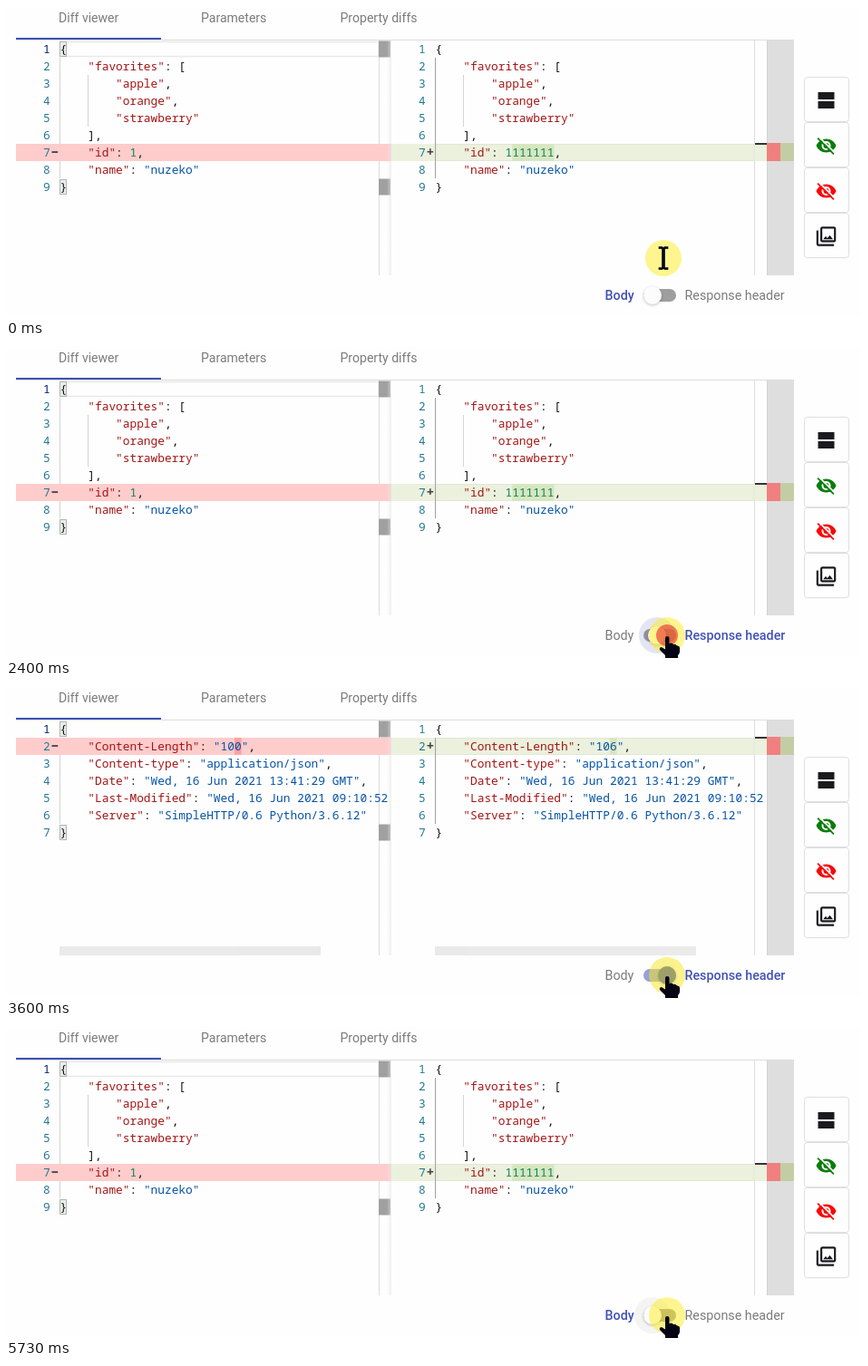
Animation, 944 px wide and 344 px high, one loop 6010 ms. Source, as an HTML page:

```html
<!DOCTYPE html>
<html lang="en">
<head>
<meta charset="utf-8">
<title>Diff viewer</title>
<style>
html, body { margin: 0; width: 100%; height: 100%; overflow: hidden; background: #fefefe; }
svg { display: block; width: 944px; height: 344px; }
text { white-space: pre; }
.ui { font: 400 14.3px Roboto, sans-serif; fill: #7b7b7b; }
.ui.tab { font-size: 14.05px; }
.ui.active { font-weight: 500; fill: #3f51b5; }
.code { font: 12.83px "Noto Sans Mono", monospace; fill: #111; }
.code.sign { font-size: 14.5px; font-weight: 700; fill: #444; }
.key { fill: #a31515; }
.str { fill: #0451a5; }
.num { fill: #098658; }
.line-no { fill: #237893; }
.line-no.current { fill: #0b216f; }
#thumb { filter: drop-shadow(0 1px 1.5px rgba(0, 0, 0, .25)); }
</style>
</head>
<body>
<svg id="stage" viewBox="0 0 944 344"></svg>
<script>
const LOOP = 6010, STEP = 1000 / 15;
const TOP = 38, ROW = 19, CHAR = 7.698;
const DIGITS_AT = { body: 11, header: 25 };

const rect = (x, y, w, h, fill, extra = '') =>
  `<rect x="${x}" y="${y}" width="${w}" height="${h}" fill="${fill}" ${extra}/>`;
const text = (x, y, cls, str, extra = '') =>
  `<text x="${x}" y="${y}" class="${cls}" ${extra}>${str}</text>`;
const rowY = n => TOP + ROW * (n - 1);

const bodyLines = id => [
  '{', '    "favorites": [', '        "apple",', '        "orange",', '        "strawberry"',
  '    ],', `    "id": ${id},`, '    "name": "nuzeko"', '}'];
const headerLines = length => [
  '{', `    "Content-Length": "${length}",`, '    "Content-type": "application/json",',
  '    "Date": "Wed, 16 Jun 2021 13:41:29 GMT",',
  '    "Last-Modified": "Wed, 16 Jun 2021 09:10:52',
  '    "Server": "SimpleHTTP/0.6 Python/3.6.12"', '}'];

function highlight(line) {
  const isArrayItem = line.startsWith('        ');
  return line.replace(/("[^"]*"?)(:?)|(\d+)/g, (_, str, colon, num) => {
    if (num) return `<tspan class="num">${num}</tspan>`;
    const cls = colon || isArrayItem ? 'key' : 'str';
    return `<tspan class="${cls}">${str}</tspan>${colon}`;
  });
}

function codeRows(x, lines, changed, sign, currentRow) {
  return lines.map((line, i) => {
    const n = i + 1, y = rowY(n) + 14;
    return text(x - 18.5, y, 'code line-no' + (n === currentRow ? ' current' : ''), n) +
      (n === changed ? text(x - 10, y, 'code sign', sign) : '') +
      text(x, y, 'code', highlight(line));
  }).join('');
}

function guides(x, last, nested, color) {
  return rect(x, rowY(2), 1, ROW * (last - 2), color) +
    (nested ? rect(x + 31, rowY(3), 1, ROW * 3, '#d3d3d3') : '');
}

function leftPane(lines, changed, mark, framed) {
  const x = 59.5, last = lines.length;
  const ends = [1, last].map(n =>
    rect(411, rowY(n) + .5, 13, 18, '#a0a0a0') +
    rect(59.5, rowY(n) + 1.5, 7, 16, '#e8efe8', 'stroke="#b4b4b4"')).join('');
  return (framed ? rect(60, 39.5, 351, 16, 'none', 'stroke="#e8e8e8" stroke-width="1.5"') : '') +
    guides(59, last, framed, '#d3d3d3') + ends +
    rect(11, rowY(changed), 414, ROW, '#ffcccc') +
    (mark ? rect(x + CHAR * mark, rowY(changed), CHAR, ROW, '#ffa3a3') : '') +
    codeRows(x, lines, changed, '−', 1);
}

function rightPane(lines, changed, mark, markLength) {
  const x = 473.5, y = rowY(changed);
  return rect(425, y, 414, ROW, '#ebf1dd') +
    rect(474, y + .5, 351, ROW - 1, 'none', 'stroke="#e2e6d6"') +
    rect(x + CHAR * mark, y, CHAR * markLength, ROW, '#d7e6c0') +
    guides(473, lines.length, lines.length > 8, '#a2a2a2') +
    codeRows(x, lines, changed, '+') +
    rect(826, y - 1, 13, 2, '#333') +
    rect(839, y - 1, 15, 20, '#f08080') + rect(854, y - 1, 15, 20, '#c3cda5');
}

const hiddenEye = color => `
  <path d="M1 12C2.7 7.6 7 4.5 12 4.5S21.3 7.6 23 12C21.3 16.4 17 19.5 12 19.5S2.7 16.4 1 12Z" fill="${color}"/>
  <circle cx="12" cy="12" r="5" fill="#fefefe"/><circle cx="12" cy="12" r="3" fill="${color}"/>
  <path d="M4 2.4L21.8 20.2" stroke="#fefefe" stroke-width="1.9"/>
  <path d="M2.6 3.6L20.4 21.4" stroke="${color}" stroke-width="1.8"/>`;

const icons = [
  rect(3, 3, 18, 8, '#1b1b1f') + rect(3, 13, 18, 8, '#1b1b1f'),
  hiddenEye('#0a7d0a'),
  hiddenEye('#f80808'),
  `<path fill="#1b1b1f" transform="translate(-.9 -.9) scale(1.075)" d="M20 4v12H8V4h12m0-2H8c-1.1 0-2 .9-2 2v12c0 1.1.9 2 2 2h12c1.1 0 2-.9 2-2V4c0-1.1-.9-2-2-2zm-8.5 9.67l1.69 2.26 2.48-3.1L19 15H9zM2 6v14c0 1.1.9 2 2 2h16v-2H4V6H2z"/>`];

const buttons = icons.map((icon, i) =>
  rect(880.5, 78.5 + 50 * i, 49, 49, '#fefefe', 'rx="3" stroke="#dedee2"') +
  `<g transform="translate(892.5 ${92 + 50 * i})">${icon}</g>`).join('');

document.getElementById('stage').innerHTML = `
  <defs><linearGradient id="edge">
    <stop offset="0" stop-color="#e6e6e6" stop-opacity="0"/><stop offset="1" stop-color="#e6e6e6" stop-opacity=".6"/>
  </linearGradient></defs>
  ${text(58, 18, 'ui tab', 'Diff viewer')}${text(215, 18, 'ui tab', 'Parameters')}${text(368.5, 18, 'ui tab', 'Property diffs')}
  ${rect(11, 37, 858, 1, '#dcdcdc')}${rect(11, 35, 160, 2, '#3f51b5')}
  ${rect(839, 38, 30, 259, '#dedede')}
  ${rect(411, 38, 1, 259, '#dcdce0')}${rect(825, 38, 1, 259, '#dcdce0')}${rect(839, 38, 1, 259, '#d2d2d6')}
  <g id="body">${leftPane(bodyLines(1), 7, 0, true)}${rightPane(bodyLines(1111111), 7, DIGITS_AT.body, 6)}</g>
  <g id="header">${leftPane(headerLines(100), 2, DIGITS_AT.header, false)}${rightPane(headerLines(106), 2, DIGITS_AT.header, 1)}</g>
  ${rect(420, 38, 5, 259, 'url(#edge)')}
  <g id="scrollbars">${rect(59, 287, 288, 10, '#c1c1c1')}${rect(473, 287, 288, 10, '#c1c1c1')}</g>
  ${buttons}
  ${text(660.5, 324, 'ui', 'Body', 'id="bodyLabel"')}
  ${text(748.5, 324, 'ui', 'Response header', 'id="headerLabel"')}
  ${rect(703, 312, 36, 14, '#9e9e9e', 'rx="7" id="track"')}
  <circle id="ripple" cy="319" r="20"/>
  <circle id="thumb" cy="319" r="10"/>
  <g id="pointer">
    <circle r="20" fill="#ffee20" fill-opacity=".5"/>
    <circle id="press" fill="#e62a2a"/>
    <path id="beam" d="M-5.5 -13H-1L0 -12L1 -13H5.5V-10H2V10H5.5V13H1L0 12L-1 13H-5.5V10H-2V-10H-5.5Z"
      fill="#080808" stroke="#fff" stroke-opacity=".5" stroke-width=".6"/>
    <path id="hand" d="M-2 3Q-2 1 0 1Q2.500 1 2.500 3V9Q5.500 7.500 7 10Q9.500 9 11 11.500Q14 11 14 14V18Q14 20.500 12 22V26H-2V22L-8 16Q-9 13 -6 13L-2 15.500Z"
      fill="#040414"/>
  </g>`;

const el = id => document.getElementById(id);
const set = (id, attrs) => {
  for (const name in attrs) el(id).setAttribute(name, attrs[name]);
};
const show = (id, on) => el(id).style.display = on ? '' : 'none';
const ramp = (t, start, length) => Math.min(1, Math.max(0, (t - start) / length));
const mix = (a, b, k) => a + (b - a) * k;
const mixColor = (a, b, k) => `rgb(${a.map((v, i) => Math.round(mix(v, b[i], k)))})`;

// time, x, y
const path = [
  [0, 725, 278], [667, 684, 317], [930, 687, 311], [1067, 687, 311], [1730, 729, 319]];
const clicks = [{ down: 2330, up: 2375 }, { down: 4670, up: 4750 }];

function pointerAt(t) {
  const i = path.findIndex(p => p[0] > t);
  if (i < 0) return path[path.length - 1].slice(1);
  const [a, b] = [path[i - 1], path[i]];
  const k = ramp(t, a[0], b[0] - a[0]), eased = k * k * (3 - 2 * k);
  return [mix(a[1], b[1], eased), mix(a[2], b[2], eased)];
}

function draw(t) {
  const [on, off] = clicks;
  const checked = t >= on.up && t < off.up;
  const headers = t >= 2530 && t < 4930;
  const slide = ramp(t, on.up, 80) - ramp(t, off.up, 80);
  const tint = ramp(t, on.up + 50, 80) - ramp(t, off.up + 50, 80);
  const click = t < off.down ? on : off;
  const age = t - click.down;

  show('body', !headers);
  show('header', headers);
  set('scrollbars', { opacity: headers ? 1 - ramp(t, 3070, 800) : 0 });
  el('bodyLabel').classList.toggle('active', !checked);
  el('headerLabel').classList.toggle('active', checked);

  const cx = 713 + 16 * slide;
  set('track', { fill: mixColor([158, 158, 158], [151, 160, 215], tint) });
  set('thumb', { cx, fill: mixColor([252, 252, 252], [63, 81, 181], tint) });
  set('ripple', {
    cx, fill: checked ? '#3f51b5' : '#000',
    opacity: .14 * ramp(age, 0, 70) - .1 * ramp(t, click.up + 200, 250)
  });

  const [x, y] = pointerAt(t);
  set('pointer', { transform: `translate(${x.toFixed(2)} ${y.toFixed(2)})` });
  show('beam', x < 703 || t < 1000);
  show('hand', x >= 703 && t >= 1000);
  const pressing = age >= 0 && age < 270;
  set('press', { r: pressing ? 8.5 + age * .05 : 0, opacity: pressing ? .8 - age * .0029 : 0 });
}

function tick() {
  const t = performance.now() % LOOP;
  draw(Math.floor((t + 4) / STEP) * STEP);
  requestAnimationFrame(tick);
}
tick();
</script>
</body>
</html>
```
